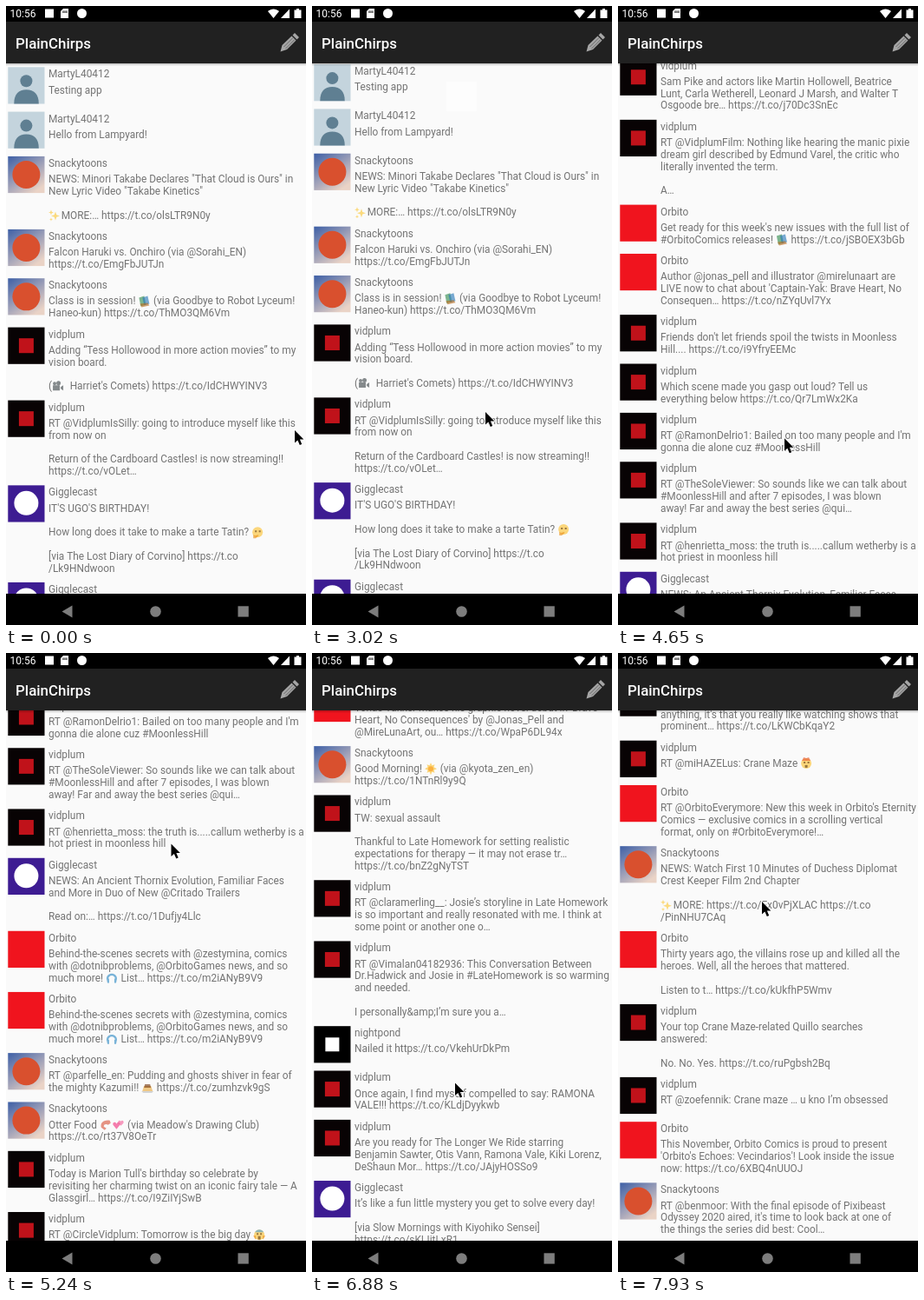
An HTML page with a canvas that plays this animation: 346x712 px, repeating every 8000 ms.

```html
<!DOCTYPE html>
<html lang="en">
<head>
<meta charset="utf-8">
<style>
  html, body { margin: 0; width: 100%; height: 100%; overflow: hidden; background: #000; }
  canvas { display: block; width: 346px; height: 712px; }
</style>
</head>
<body>
<canvas id="stage"></canvas>
<script>
const W = 346, H = 712, LIST_TOP = 66, LIST_BOTTOM = 676;
const LOOP = 8000, FIRST_TICK = 488, TICK = 148.4;
const LINE = 13.8, TEXT = '11.86px Roboto, sans-serif';

const USERS = { K: 'MartyL40412', S: 'Snackytoons', V: 'vidplum', G: 'Gigglecast', O: 'Orbito', N: 'nightpond' };

// One post per line: user key, then its lines of text.
const POSTS = `K|Testing app
K|Hello from Lampyard!
S|NEWS: Minori Takabe Declares "That Cloud is Ours" in|New Lyric Video "Takabe Kinetics"||✨MORE:… https://t.co/olsLTR9N0y
S|Falcon Haruki vs. Onchiro (via @Sorahi_EN)|https://t.co/EmgFbJUTJn
S|Class is in session! 📚 (via Goodbye to Robot Lyceum!|Haneo-kun) https://t.co/ThMO3QM6Vm
V|Adding “Tess Hollowood in more action movies” to my|vision board.||(🎥  Harriet's Comets) https://t.co/IdCHWYINV3
V|RT @VidplumIsSilly: going to introduce myself like this|from now on||Return of the Cardboard Castles! is now streaming!!|https://t.co/vOLet…
G|IT'S UGO'S BIRTHDAY!||How long does it take to make a tarte Tatin? 🤔||[via The Lost Diary of Corvino] https://t.co|/Lk9HNdwoon
G|RT @MizuharaManga: Ivar's getting ready for|some big announcements during Mizuhara Live|#SiegeofOlthar Special tomorrow, September 29 at|3p…
S|FEATURE: Rika's Thunderstruck Adventure And The|Beautiful Places That Inspired It||✨MORE: https://t.co/sVwJbaCNIP https://t.co|/1LTqxi64kd
V|Sam Pike and actors like Martin Hollowell, Beatrice|Lunt, Carla Wetherell, Leonard J Marsh, and Walter T|Osgoode bre… https://t.co/j70Dc3SnEc
V|RT @VidplumFilm: Nothing like hearing the manic pixie|dream girl described by Edmund Varel, the critic who|literally invented the term.||A…
O|Get ready for this week's new issues with the full list of|#OrbitoComics releases! 📚 https://t.co/jSBOEX3bGb
O|Author @jonas_pell and illustrator @mirelunaart are|LIVE now to chat about 'Captain-Yak: Brave Heart, No|Consequen… https://t.co/nZYqUvl7Yx
V|Friends don't let friends spoil the twists in Moonless|Hill.... https://t.co/i9YfryEEMc
V|Which scene made you gasp out loud? Tell us|everything below https://t.co/Qr7LmWx2Ka
V|RT @RamonDelrio1: Bailed on too many people and I'm|gonna die alone cuz #MoonlessHill
V|RT @TheSoleViewer: So sounds like we can talk about|#MoonlessHill and after 7 episodes, I was blown|away! Far and away the best series @qui…
V|RT @henrietta_moss: the truth is.....callum wetherby is a|hot priest in moonless hill
G|NEWS: An Ancient Thornix Evolution, Familiar Faces|and More in Duo of New @Critado Trailers||Read on:… https://t.co/1Dufjy4Llc
O|Behind-the-scenes secrets with @zestymina, comics|with @dotnibproblems, @OrbitoGames news, and so|much more! 🎧 List… https://t.co/m2iANyB9V9
O|Behind-the-scenes secrets with @zestymina, comics|with @dotnibproblems, @OrbitoGames news, and so|much more! 🎧 List… https://t.co/m2iANyB9V9
S|RT @parfelle_en: Pudding and ghosts shiver in fear of|the mighty Kazumi!! 🍮 https://t.co/zumhzvk9gS
S|Otter Food 🦐💕 (via Meadow's Drawing Club)|https://t.co/rt37V8OeTr
V|Today is Marion Tull's birthday so celebrate by|revisiting her charming twist on an iconic fairy tale — A|Glassgirl… https://t.co/I9ZiIYjSwB
V|RT @CircleVidplum: Tomorrow is the big day 😱|Who will be the last one standing when the|doors open? https://t.co/Hb4TnZc8Ue
G|ICYMI: Live-Action @RodeoComets Preps for Takeoff|with New Poster, Opening Credits 🚀||Read on:… https://t.co/Ii3Rhc7YUE
V|RT @dinamaywell: one of the most pivotal moments|came in 2009 when Bethany asked AGAIN for a lawyer.|this could have Been all over then. No…
O|☢ @LanternDialsUS just got a little more incredible!|This smashing new Ogro watch is powered by their|signature So… https://t.co/TELj3ViFfm
V|“No one really talks about the fact that there was|another attempt to get a lawyer that somehow didn’t|work out.”… https://t.co/J8ttT9I6NQ
V|RT @K_MAROVE: “The people who did this to me|shouldn’t get to walk away so easily” #BethanyVsHollis|@vidplum https://t.co/Pnl6SeLW65
V|RT @HushedTwilight: After the conservatorship under|which Bethany Hollis has lived for 13 years likely ends|this week, shortcomings in lega…
G|NEWS: Kazoku Meisei: Restless Resurrection Tops|@TooniChart Most Anticipated Fall 2021 Anime Poll 😱||Read on:… https://t.co/t3h3MxOBYg
S|NEWS: Get a Closer Look at Yokohama's Walking|Goliath Via Online Tours||✨MORE: https://t.co/IrLBcMibLT https://t.co|/RgJ34c9hAU
O|Yonas Yakker makes his graphic novel debut in 'Brave|Heart, No Consequences' by @Jonas_Pell and|@MireLunaArt, ou… https://t.co/WpaP6DL94x
S|Good Morning! ☀ (via @kyota_zen_en)|https://t.co/1NTnRl9y9Q
V|TW: sexual assault||Thankful to Late Homework for setting realistic|expectations for therapy — it may not erase tr…|https://t.co/bnZ2gNyTST
V|RT @claramerling__: Josie’s storyline in Late Homework|is so important and really resonated with me. I think at|some point or another one o…
V|RT @Vimalan04182936: This Conversation Between|Dr.Hadwick and Josie in #LateHomework is so warming|and needed.||I personally&amp;I’m sure you a…
N|Nailed it https://t.co/VkehUrDkPm
V|Once again, I find myself compelled to say: RAMONA|VALE!!! https://t.co/KLdjDyykwb
V|Are you ready for The Longer We Ride starring|Benjamin Sawter, Otis Vann, Ramona Vale, Kiki Lorenz,|DeShaun Mor… https://t.co/JAjyHOSSo9
G|It’s like a fun little mystery you get to solve every day!||[via Slow Mornings with Kiyohiko Sensei]|https://t.co/sKIJitLxR1
O|New heroes, new worlds and a brand new team.|Take a first look at the covers coming to shops|this winter https://t.co/Wd5KpNe1Ra
S|NEWS: New Season Trailer Reveals Cast and Opening|Theme Song||✨MORE: https://t.co/Tn8YcVb3Lo https://t.co|/Gm2XsHq7Ed
V|If your watch history has taught us|anything, it's that you really like watching shows that|prominent… https://t.co/LKWCbKqaY2
V|RT @miHAZELus: Crane Maze 🤯
O|RT @OrbitoEverymore: New this week in Orbito's Eternity|Comics — exclusive comics in a scrolling vertical|format, only on #OrbitoEverymore!…
S|NEWS: Watch First 10 Minutes of Duchess Diplomat|Crest Keeper Film 2nd Chapter||✨MORE: https://t.co/Ex0vPjXLAC https://t.co|/PinNHU7CAq
O|Thirty years ago, the villains rose up and killed all the|heroes. Well, all the heroes that mattered.||Listen to t… https://t.co/kUkfhP5Wmv
V|Your top Crane Maze-related Quillo searches|answered:||No. No. Yes. https://t.co/ruPgbsh2Bq
V|RT @zoefennik: Crane maze … u kno I’m obsessed
O|This November, Orbito Comics is proud to present|'Orbito's Echoes: Vecindarios'! Look inside the issue|now: https://t.co/6XBQ4nUUOJ
S|RT @benmoor: With the final episode of Pixibeast|Odyssey 2020 aired, it's time to look back at one of|the things the series did best: Cool…`;

let nextTop = 70;
const rows = POSTS.split('\n').map(post => {
  const [user, ...lines] = post.split('|');
  const height = Math.max(51.3, 28.77 + LINE * lines.length);
  const row = { user, lines, top: nextTop, height };
  nextTop += height;
  return row;
});

// Keys are [tick, value, ...], joined by straight lines.
const SCROLL = [[-1, 0], [0, 2], [5, 8], [6, 8], [9, 0], [13, 0], [14, 3.2], [21, 3.2],
  [22, 50], [25, 517.3], [27, 730], [29, 838], [30, 890], [32, 1199], [34, 1480], [36, 1625], [37, 1655],
  [38, 1705], [39, 1848.6], [41, 2200], [43, 2491.8], [44, 2502], [45, 2560], [48, 3060], [50, 3320.2]];
const POINTER = [[-1, 333, 488], [0, 320, 440], [5, 205, 150], [6, 205, 150], [14, 200, 467], [21, 200, 467],
  [22, 200, 420], [23, 200, 220], [25, 198, 495], [29, 190, 498], [30, 190, 430], [32, 190.5, 219.5],
  [34, 190, 420], [37, 190, 490], [38, 190, 460], [39, 190.5, 316.5], [40, 182, 230], [43, 165, 494.5],
  [44, 165, 494.5], [45, 165, 450], [47, 165, 200], [50, 166, 286]];

function valuesAt(keys, tick) {
  const next = keys.findIndex(key => key[0] >= tick);
  if (next <= 0) return keys.at(next).slice(1);
  const a = keys[next - 1], b = keys[next], p = (tick - a[0]) / (b[0] - a[0]);
  return a.slice(1).map((v, i) => v + (b[i + 1] - v) * p);
}

const DISC = 'M1 7a6 6 0 1 0 12 0a6 6 0 1 0-12 0z';
const HEART = 'M5 12L1 7C0 4 4 3 5 6C6 3 10 4 9 7z';
const FACE = [['#fbc02d', DISC], ['#5a3a1a', 'M4 5h2v2h-2zM8.500 5h2v2h-2z']];
// Layers of [colour, path] in a 14-unit box.
const EMOJI = {
  '✨': [['#fbc730', 'M8 3L9.300 6.700 13 8 9.300 9.300 8 13 6.700 9.300 3 8 6.700 6.700zM3 1l.8 2.200L6 4l-2.200.8L3 7l-.8-2.200L0 4l2.200-.8zM3 10l.6 1.400L5 12l-1.400.6L3 14l-.6-1.400L1 12l1.400-.6z']],
  '📚': [['#2e8b4c', 'M1 3l6-2 2 10-6 2z'], ['#2678b8', 'M5 3l6-2 2 9-6 2z'], ['#b86c1e', 'M2 10l9-1 2 3-9 2z']],
  '🎥': [['#3c4347', 'M1 6h8v6h-8zM10 8l3-2v6l-3-2zM1 4a2 2 0 1 0 4 0a2 2 0 1 0-4 0M5 3.500a2.500 2.500 0 1 0 5 0a2.500 2.500 0 1 0-5 0']],
  '🤔': [...FACE, ['#e88a10', 'M2 14v-4l2 1 4-1v1l-3 3z']],
  '🎧': [['#2a88c4', 'M1 9C0 0 14 0 13 9h-2C11 3 3 3 3 9zM1 8h3v5h-2zM10 8h3l-1 5h-2z']],
  '🍮': [['#e9a93d', 'M3 5h8l2 6h-12z'], ['#75370f', 'M4 3h6l1 4h-8z'], ['#b9bdc0', 'M0 11h14l-2 2h-10z']],
  '🦐': [['#d9543a', 'M12 2C4 1 1 5 2 10l4 3 2-2-3-2c0-3 3-3 5-2l3-2z']],
  '💕': [['#f0307c', HEART], ['#f4609a', 'M10 8L7 5C6 2 9 1 10 3C11 1 14 2 13 5z']],
  '😱': [['#fbc02d', DISC], ['#4a9fd8', 'M2 4C4 0 10 0 12 4z'], ['#5a3a1a', 'M4 5h2v2h-2zM8 5h2v2h-2zM5.500 8.500h3v4h-3z'], ['#e88a10', 'M0 8h3v5zM14 8h-3v5z']],
  '🚀': [['#8fa6b4', 'M13 1C8 1 5 4 3 9l2 2c5-2 8-5 8-10z'], ['#d3342a', 'M2 6l3-1-2 4zM9 9l-1 3-3-1zM3 10l1 1-3 2z']],
  '☢': [['#fbc02d', DISC], ['#302a18', 'M7 7L4 2h6zM7 7h6l-3 5zM7 7H1l3 5z']],
  '☀': [['#fbc02d', 'M7 0l1.500 3 3-1-1 3L14 7l-3.500 1.500 1 3-3-1L7 14l-1.500-3.500-3 1 1-3L0 7l3.500-2-1-3 3 1z'], ['#f89a1c', 'M4 7a3 3 0 1 0 6 0a3 3 0 1 0-6 0']],
  '🤯': [...FACE, ['#e5562f', 'M2 4L4 0l3 1 3-1 2 4z'], ['#5a3a1a', 'M5.500 9h3v3h-3z']]
};
for (const layers of Object.values(EMOJI)) {
  for (const layer of layers) layer.path ??= new Path2D(layer[1]);
}
const EMOJI_SPLIT = new RegExp(`(${Object.keys(EMOJI).join('|')})`, 'u');

const canvas = document.getElementById('stage');
const ctx = canvas.getContext('2d');
const ratio = window.devicePixelRatio || 1;
canvas.width = W * ratio;
canvas.height = H * ratio;
ctx.scale(ratio, ratio);

function rect(color, x, y, w, h) {
  ctx.fillStyle = color;
  ctx.fillRect(x, y, w, h);
}
function disc(color, x, y, r) {
  ctx.fillStyle = color;
  ctx.beginPath();
  ctx.arc(x, y, r, 0, 7);
  ctx.fill();
}
function shape(color, path) {
  ctx.fillStyle = color;
  ctx.fill(new Path2D(path));
}
function label(text, x, y, font, color) {
  ctx.font = font;
  ctx.fillStyle = color;
  ctx.fillText(text, x, y);
}

function richText(text, x, y) {
  for (const part of text.split(EMOJI_SPLIT)) {
    if (EMOJI[part]) {
      // Emoji share the translucency of the grey text.
      ctx.save();
      ctx.globalAlpha = 0.62;
      ctx.translate(x, y - 11);
      for (const layer of EMOJI[part]) {
        ctx.fillStyle = layer[0];
        ctx.fill(layer.path);
      }
      ctx.restore();
      x += 14.7;
    } else {
      label(part, x, y, TEXT, '#737373');
      x += ctx.measureText(part).width;
    }
  }
}

const SIZE = 42.2;
const AVATARS = {
  K() {
    rect('#c4d4dd', 0, 0, SIZE, SIZE);
    disc('#5f7f92', 21.1, 16, 7);
    shape('#5f7f92', 'M7 42.200C7 31 12 26 21.100 26S35.500 31 35.500 42.200z');
  },
  S() {
    const sky = ctx.createLinearGradient(0, 0, 30, SIZE);
    sky.addColorStop(0, '#3d5fa6');
    sky.addColorStop(1, '#ead3c6');
    rect(sky, 0, 0, SIZE, SIZE);
    disc('#d9502e', 21.1, 21.1, 16);
  },
  V() {
    rect('#080304', 0, 0, SIZE, SIZE);
    rect('#c0121a', 12.6, 12.6, 17, 17);
  },
  G() {
    rect('#3d1c92', 0, 0, SIZE, SIZE);
    disc('#fff', 21.1, 20.5, 14);
  },
  O() { rect('#f0141e', 0, 0, SIZE, SIZE); },
  N() {
    rect('#000', 0, 0, SIZE, SIZE);
    rect('#fff', 13.1, 13.1, 16, 16);
  }
};

function drawRow({ user, lines, top }, scroll) {
  const y = top - scroll;
  ctx.save();
  ctx.translate(2.3, y + 0.3);
  AVATARS[user]();
  ctx.restore();
  label(USERS[user], 49, y + 12.3, TEXT, '#737373');
  lines.forEach((line, i) => richText(line, 49, y + 30.5 + i * LINE));
}

function drawSpinner(tick) {
  if (tick < 7 || tick > 21) return;
  if (tick > 16) {
    rect('#fdfdfd', 155, 87, 35, 34);
    return;
  }
  const y = Math.min(104, 56 + (tick - 7) * 16);
  const scale = tick < 15 ? 1 : 0.8 - 0.4 * (tick - 15);
  ctx.save();
  ctx.translate(172.5, y);
  ctx.scale(scale, scale);
  ctx.shadowColor = 'rgba(0,0,0,.25)';
  ctx.shadowBlur = 4;
  ctx.shadowOffsetY = 1;
  disc('#fafafa', 0, 0, 16.5);
  ctx.shadowColor = 'transparent';
  ctx.strokeStyle = '#222';
  ctx.lineWidth = 2;
  ctx.beginPath();
  ctx.arc(0, 0, 6.5, tick, tick + 4.5);
  ctx.stroke();
  ctx.restore();
}

function drawBars() {
  rect('#000', 0, 0, W, 18);
  label('10:56', 4.5, 12.5, '12px Roboto, sans-serif', '#fff');
  rect('#fff', 45, 3.5, 10, 10);
  shape('#fff', 'M66 3h6v11h-9v-8z');
  shape('#000', 'M65.500 5.500h1v2.500h-1zM67.500 5.500h1v2.500h-1zM69.500 5.500h1v2.500h-1z');
  disc('#fff', 87.5, 8.5, 5.5);
  shape('#fff', 'M302 6C306 2.500 311 2.500 315 6L308.500 14z');
  shape('#fff', 'M327 3.500V14H317z');
  shape('#fff', 'M335 3h3v1.500h2.500V14h-8V4.500h2.500z');

  rect('#212121', 0, 18, W, 48);
  label('PlainChirps', 11, 48.5, '500 16.900px Roboto, sans-serif', '#fff');
  shape('#a6a6a6', 'M316.500 52.500L318.500 45 329.500 34.500 334.500 39.500 324 50zM330.500 33.500L333 31 338 36 335.500 38.500z');
  ctx.strokeStyle = '#555';
  ctx.lineWidth = 0.8;
  ctx.stroke(new Path2D('M320.500 47L331 36.500M322.500 49L333 38.500'));
  const shadow = ctx.createLinearGradient(0, LIST_TOP, 0, LIST_TOP + 3);
  shadow.addColorStop(0, 'rgba(0,0,0,.25)');
  shadow.addColorStop(1, 'rgba(0,0,0,0)');
  rect(shadow, 0, LIST_TOP, W, 3);

  rect('#000', 0, LIST_BOTTOM, W, H - LIST_BOTTOM);
  shape('#7d7d7d', 'M64.500 696.500L76.500 689.500V703.500z');
  disc('#7d7d7d', 172.5, 696.5, 6.3);
  rect('#7d7d7d', 267.5, 690.3, 12.3, 12.3);
}

function drawPointer([x, y]) {
  ctx.save();
  ctx.translate(x, y);
  const arrow = new Path2D('M0 0V14.500L3.400 11.500 5.800 17 8.200 16 5.900 10.600H10.400z');
  ctx.strokeStyle = '#fff';
  ctx.lineWidth = 1.6;
  ctx.lineJoin = 'round';
  ctx.stroke(arrow);
  ctx.fillStyle = '#000';
  ctx.fill(arrow);
  ctx.restore();
}

function render() {
  // The screen refreshes in coarse, even steps.
  const tick = Math.floor((performance.now() % LOOP - FIRST_TICK) / TICK);
  const [scroll] = valuesAt(SCROLL, tick);
  rect('#fafafa', 0, 0, W, H);
  for (const row of rows) {
    const y = row.top - scroll;
    if (y + row.height > LIST_TOP && y < LIST_BOTTOM) drawRow(row, scroll);
  }
  drawSpinner(tick);
  drawBars();
  drawPointer(valuesAt(POINTER, tick));
  requestAnimationFrame(render);
}
render();
</script>
</body>
</html>
```
